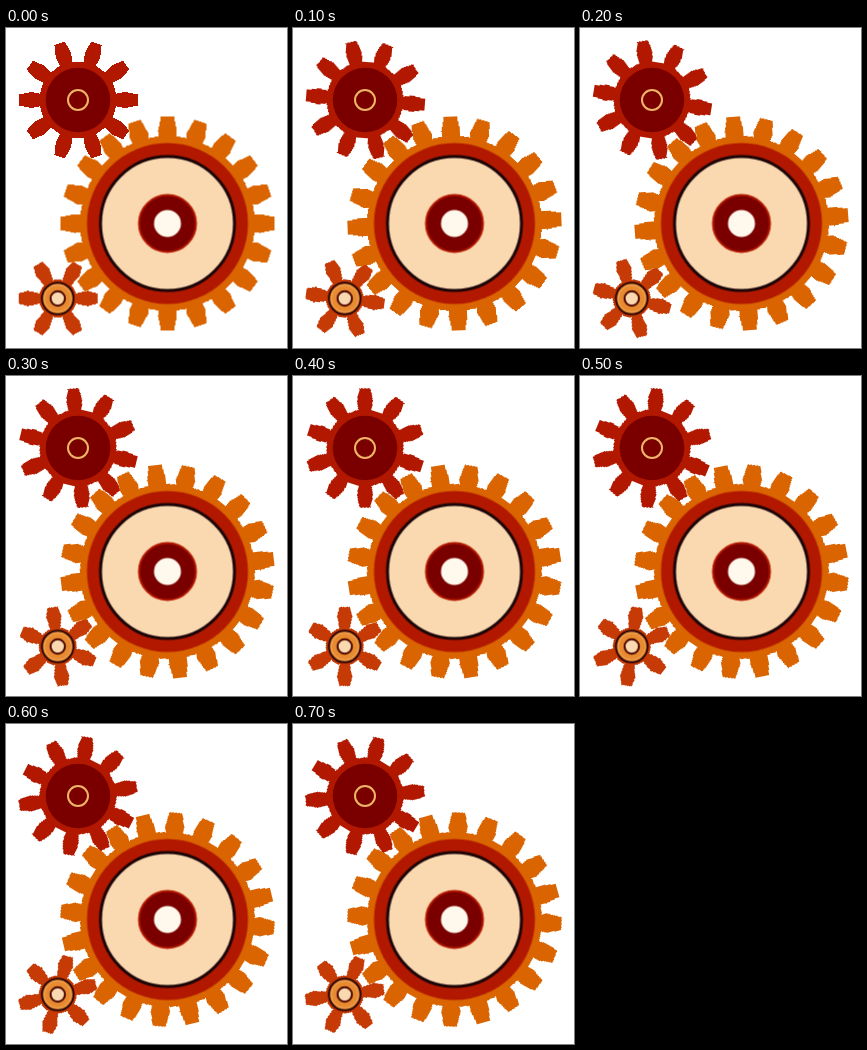
Write an HTML page without scripts that moves like this. It is 281 px wide and 320 px high and loops after 0.8 s.

```html
<!DOCTYPE html>
<html lang="en">
<head>
<meta charset="utf-8">
<title>Gears</title>
<style>
  html, body { margin: 0; width: 100%; height: 100%; overflow: hidden; background: #fff; }
  svg { display: block; width: 100vw; height: 100vh; }
  .teeth { shape-rendering: crispEdges; animation: turn .8s steps(8) infinite; }
  /* each gear advances by exactly one tooth per loop */
  @keyframes turn { to { transform: rotate(var(--pitch)); } }
  .large { --pitch: -18deg; fill: #d96400; }
  .medium { --pitch: 36deg; fill: #b21800; }
  .small { --pitch: 60deg; fill: #c63a06; }
</style>
</head>
<body>
<svg viewBox="0 0 281 320">
  <defs>
    <!-- opposite pairs of teeth -->
    <path id="l" d="M-6.5-107h13l3 14.5-1.5 10.5h-16l-1.500-10.500zM-6.500 107h13l3-14.500-1.500-10.500h-16l-1.500 10.500z"/>
    <path id="m" d="M-5.500-59.500h11l2.500 12.500-2 11h-12l-2-11zM-5.500 59.500h11l2.500-12.500-2-11h-12l-2 11z"/>
    <path id="s" d="M-5-39.500h10l2.800 9.500-3.300 14h-9l-3.300-14zM-5 39.500h10l2.800-9.500-3.300-14h-9l-3.300 14z"/>
  </defs>

  <g transform="translate(72 72)">
    <g class="teeth medium">
      <circle r="38.500"/>
      <use href="#m" transform="rotate(18)"/>
      <use href="#m" transform="rotate(54)"/>
      <use href="#m" transform="rotate(90)"/>
      <use href="#m" transform="rotate(126)"/>
      <use href="#m" transform="rotate(162)"/>
    </g>
    <circle r="32.300" fill="#7a0000"/>
    <circle r="10" fill="none" stroke="#eeb566" stroke-width="2"/>
  </g>

  <g transform="translate(51.700 270.500)">
    <g class="teeth small">
      <circle r="19"/>
      <use href="#s" transform="rotate(30)"/>
      <use href="#s" transform="rotate(90)"/>
      <use href="#s" transform="rotate(150)"/>
    </g>
    <circle r="15.800" fill="#e88a30" stroke="#2a0505" stroke-width="2"/>
    <circle r="13.500" fill="none" stroke="#f0a95c"/>
    <circle r="7.200" fill="#fad9b0" stroke="#4a0500" stroke-width="2"/>
  </g>

  <g transform="translate(161.500 195.500)">
    <g class="teeth large">
      <circle r="87.500"/>
      <use href="#l"/>
      <use href="#l" transform="rotate(18)"/>
      <use href="#l" transform="rotate(36)"/>
      <use href="#l" transform="rotate(54)"/>
      <use href="#l" transform="rotate(72)"/>
      <use href="#l" transform="rotate(90)"/>
      <use href="#l" transform="rotate(108)"/>
      <use href="#l" transform="rotate(126)"/>
      <use href="#l" transform="rotate(144)"/>
      <use href="#l" transform="rotate(162)"/>
    </g>
    <circle r="80.500" fill="#b21800"/>
    <circle r="67" fill="#fad9b0" stroke="#1c0508" stroke-width="3"/>
    <circle r="28.500" fill="#7a0000" stroke="#b21800" stroke-width="2"/>
    <circle r="13.500" fill="#fff8ec"/>
  </g>
</svg>
</body>
</html>
```
